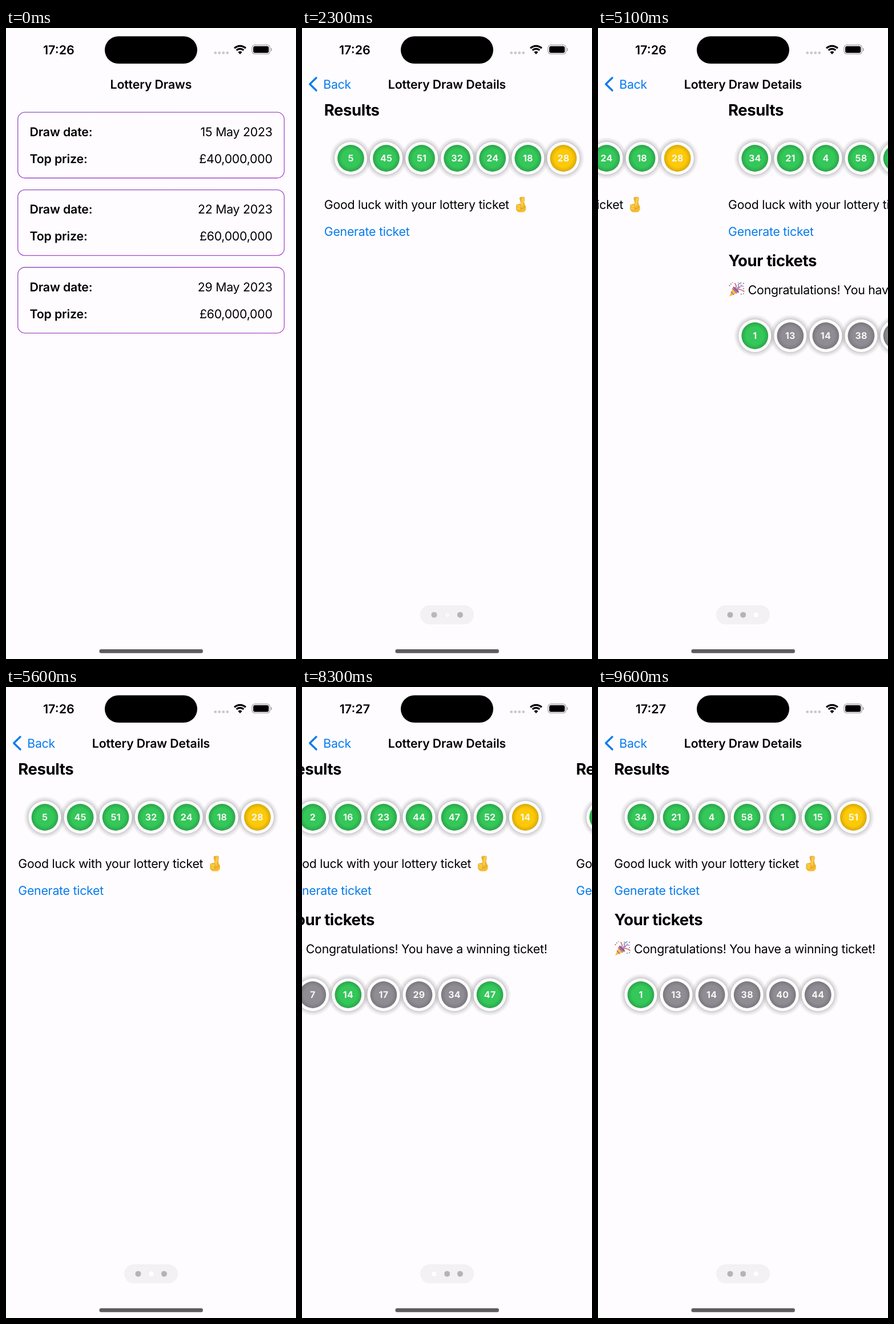
Recreate the animation shown at these times as an HTML page. Size 508 by 1102 pixels, loop 9700 ms.

```html
<!DOCTYPE html>
<html lang="en">
<head>
<meta charset="utf-8">
<title>Lottery Draws</title>
<style>
  html, body { margin: 0; width: 100%; height: 100%; overflow: hidden; background: #fefcff; }
  svg { display: block; width: 100vw; height: 100vh; }
  text {
    font-family: Inter, "Liberation Sans", sans-serif;
    font-optical-sizing: none;
    text-rendering: geometricPrecision;
    white-space: pre;
  }
  .body { font-size: 21.3px; font-weight: 400; letter-spacing: -.245px; }
  .semi { font-size: 21.3px; font-weight: 600; letter-spacing: -.12px; }
  .head { font-size: 27.5px; font-weight: 700; letter-spacing: -.4px; }
  .num  { font-size: 16px; font-weight: 700; letter-spacing: .2px; fill: #f6f8f6; }
  .clock { font-size: 21.5px; font-weight: 600; }
  .link { fill: #067bec; }
</style>
</head>
<body>
<svg id="stage" viewBox="0 0 508 1102" xmlns="http://www.w3.org/2000/svg">
  <defs>
    <linearGradient id="edge" x1="0" y1="0" x2="1" y2="1">
      <stop offset="0" stop-color="#9150c4"/><stop offset="1" stop-color="#ac48cc"/>
    </linearGradient>
    <linearGradient id="shade">
      <stop offset="0" stop-color="#000" stop-opacity="0"/><stop offset="1" stop-color="#000" stop-opacity=".08"/>
    </linearGradient>
    <radialGradient id="halo">
      <stop offset=".74" stop-color="#000" stop-opacity=".23"/>
      <stop offset=".86" stop-color="#000" stop-opacity=".1"/>
      <stop offset="1" stop-color="#000" stop-opacity="0"/>
    </radialGradient>
    <g id="luck" fill="none" stroke-linecap="round" stroke-linejoin="round">
      <path d="M15 15L11.5 4" stroke="#d8951b" stroke-width="5.6"/>
      <path d="M15 15L11.5 4" stroke="#f2b52c" stroke-width="4.6"/>
      <rect x="2.5" y="13" width="17.5" height="14.8" rx="6.5" fill="#f6bd34"/>
      <path d="M12.5 16L15 3.8" stroke="#d8951b" stroke-width="5.8"/>
      <path d="M12.5 16L15 3.8" stroke="#fbcb45" stroke-width="4.8"/>
      <path d="M5 16.500l4 1M5 21l4 1" stroke="#d8951b" stroke-width="5"/>
      <path d="M5 16.500l4 1M5 21l4 1" stroke="#fbcb45" stroke-width="4"/>
      <path d="M18 17q-1 5-8 5" stroke="#d8951b" stroke-width="1.2"/>
    </g>
    <g id="party" fill="none" stroke-linecap="round">
      <path d="M1 26L8 9Q15 11 18 19Z" fill="#f7c23c"/>
      <path d="M4.5 18l4 4.600M7 12l7 8" stroke="#a763c4" stroke-width="1.6"/>
      <ellipse cx="13" cy="14" rx="7" ry="2" transform="rotate(45 13 14)" fill="#8a5a9c"/>
      <path d="M12 12Q15 8 11 3M15 14Q20 12 27 17" stroke="#e65a6c" stroke-width="1.7"/>
      <path d="M14 13Q18 10 17 7T22 2" stroke="#4f9de8" stroke-width="1.7"/>
      <path d="M17 12Q20 7 26 8" stroke="#c77fd6" stroke-width="1.5"/>
      <g stroke-width="2.2">
        <path d="M4 4h.1M26 12h.1M22 22h.1" stroke="#4f9de8"/>
        <path d="M7 1.500h.1M17 2h.1M23 15h.1" stroke="#f5b52f"/>
        <path d="M1.500 7h.1M26 3h.1M19 10h.1" stroke="#e65a6c"/>
        <path d="M26 21h.1M22 6h.1" stroke="#63bd62"/>
      </g>
    </g>
  </defs>
</svg>
<script>
const W = 508, H = 1102, LOOP = 9700, STEP = 100, BG = '#fefcff';
const stage = document.getElementById('stage');
const clamp = v => Math.min(1, Math.max(0, v));

function add(parent, tag, attrs = {}) {
  const el = document.createElementNS('http://www.w3.org/2000/svg', tag);
  for (const k in attrs) el.setAttribute(k, attrs[k]);
  parent.append(el);
  return el;
}
const group = parent => add(parent, 'g');
const rect = (parent, x, y, width, height, rx, fill) =>
  add(parent, 'rect', { x, y, width, height, rx, fill });
const circle = (parent, cx, cy, r, fill) => add(parent, 'circle', { cx, cy, r, fill });
function text(parent, str, x, y, cls, anchor = 'start') {
  const el = add(parent, 'text', { x, y, class: cls, 'text-anchor': anchor });
  el.textContent = str;
  return el;
}
const moveX = (el, x) => el.setAttribute('transform', `translate(${x.toFixed(2)} 0)`);
const fade = (el, a) => el.setAttribute('opacity', a.toFixed(3));

const COLORS = {
  green: ['#34c759', '#2ba54b'],
  gold: ['#fdca08', '#d9a80b'],
  gray: ['#8f8d93', '#7a787e']
};
for (const name in COLORS) {
  const grad = add(stage.querySelector('defs'), 'radialGradient', { id: name });
  const [mid, rim] = COLORS[name];
  add(grad, 'stop', { offset: .66, 'stop-color': mid });
  add(grad, 'stop', { offset: 1, 'stop-color': rim });
}

function balls(parent, nums, y, color) {
  nums.forEach((n, i) => circle(parent, 68 + i * 62.07, y, 37, 'url(#halo)'));
  nums.forEach((n, i) => {
    const x = 68 + i * 62.07;
    circle(parent, x, y, 28.5, '#fff');
    circle(parent, x, y, 23.4, `url(#${color(n, i)})`);
    text(parent, n, x, y + 5.8, 'num', 'middle');
  });
}

// List screen
const list = group(stage);
rect(list, 0, 0, W, H, 0, BG);
[['15 May 2023', '£40,000,000'], ['22 May 2023', '£60,000,000'], ['29 May 2023', '£60,000,000']]
  .forEach(([date, prize], i) => {
    const y = 147.2 + i * 135.4;
    const box = rect(list, 20.7, y, 466.7, 114.8, 12.5, 'none');
    box.setAttribute('stroke', 'url(#edge)');
    box.setAttribute('stroke-width', 1.3);
    text(list, 'Draw date:', 41.4, y + 41.8, 'semi');
    text(list, date, 466.6, y + 41.8, 'body', 'end');
    text(list, 'Top prize:', 41.4, y + 88.8, 'semi');
    text(list, prize, 466.6, y + 88.8, 'body', 'end');
  });
const dim = rect(stage, 0, 0, W, H, 0, '#000');

// Detail screen
const detail = group(stage);
rect(detail, -10, 0, 10, H, 0, 'url(#shade)');
rect(detail, 0, 0, W, H, 0, BG);
const strip = group(detail);

const DRAWS = [
  { nums: [2, 16, 23, 44, 47, 52, 14], ticket: [7, 14, 17, 29, 34, 47], tap: 7200 },
  { nums: [5, 45, 51, 32, 24, 18, 28] },
  { nums: [34, 21, 4, 58, 1, 15, 51], ticket: [1, 13, 14, 38, 40, 44], tap: 4300 }
];
DRAWS.forEach((draw, i) => {
  const page = group(strip);
  moveX(page, i * W);
  text(page, 'Results', 21.2, 153.4, 'head');
  balls(page, draw.nums, 227.5, (n, k) => k < 6 ? 'green' : 'gold');
  text(page, 'Good luck with your lottery ticket', 21.3, 316, 'body');
  add(page, 'use', { href: '#luck', transform: 'translate(355 294)' });
  draw.button = text(page, 'Generate ticket', 21.3, 363.2, 'body link');
  if (!draw.ticket) return;
  draw.panel = group(page);
  text(draw.panel, 'Your tickets', 21.6, 415.9, 'head');
  add(draw.panel, 'use', { href: '#party', transform: 'translate(22 443)' });
  text(draw.panel, 'Congratulations! You have a winning ticket!', 56, 464.8, 'body');
  balls(draw.panel, draw.ticket, 537.5, n => draw.nums.includes(n) ? 'green' : 'gray');
});

rect(detail, 207, 1008.3, 94, 33.2, 16.6, '#f3f1f4');
const dots = [231.5, 254.2, 277].map(x => {
  circle(detail, x, 1024.9, 5, '#b5b3b7');
  return circle(detail, x, 1024.9, 5, '#fefdff');
});

// Navigation bar
const listTitle = text(stage, 'Lottery Draws', 254, 105.8, 'semi', 'middle');
const detailTitle = text(stage, 'Lottery Draw Details', 254, 105.8, 'semi', 'middle');
const chevron = add(stage, 'path', {
  d: 'M25 87L13.7 98L25 109', fill: 'none', stroke: '#067bec', 'stroke-width': 3.3,
  'stroke-linecap': 'round', 'stroke-linejoin': 'round'
});
const back = text(stage, 'Back', 37.2, 105.8, 'body link');

// Status bar and home indicator
const clock = text(stage, '17:26', 92.4, 45.9, 'clock', 'middle');
rect(stage, 173, 14.4, 162, 47.8, 23.9, '#000');
for (let i = 0; i < 4; i++) rect(stage, 364.6 + i * 7, 41.2, 4.4, 4.4, 1.4, '#c9c7cb');
const arc = (r, width) => {
  const dx = r * Math.SQRT1_2;
  add(stage, 'path', {
    d: `M${410 - dx} ${45.2 - dx}A${r} ${r} 0 0 1 ${410 + dx} ${45.2 - dx}`,
    fill: 'none', stroke: '#000', 'stroke-width': width
  });
};
arc(13.9, 3.2);
arc(8.9, 3.2);
add(stage, 'path', { d: 'M410 46L406.3 42Q410 38.8 413.7 42Z' });
const shell = rect(stage, 431, 29.6, 31.4, 15.9, 5, 'none');
shell.setAttribute('stroke', '#9f9da1');
shell.setAttribute('stroke-width', 1.2);
rect(stage, 433.1, 31.7, 27.2, 11.8, 3.2, '#000');
rect(stage, 464, 35, 1.7, 5.2, .8, '#a4a2a6');
rect(stage, 163.5, 1085.1, 181.5, 6.6, 3.3, '#5d5c5f');

// Start time, page left, page reached
const SWIPES = [[1995, 0, 1], [3200, 1, 2], [5000, 2, 1], [6205, 1, 0], [8300, 0, 1], [9258, 1, 2]];
const glide = s => 1 - Math.exp(-38.77 * (s + .138) ** 3);
const settle = x => 1 - (1 + x) * Math.exp(-x);

function pager(t) {
  let pos = 0, from = 0, to = 0, mix = 1;
  for (const [start, a, b] of SWIPES) {
    const s = (t - start) / 1000;
    if (s < -.01) break;
    [from, to] = [a, b];
    pos = a + (b - a) * (s > .55 ? 1 : glide(s));
    mix = clamp((s - .12) / .2);
  }
  return { pos, lit: dots.map((d, i) => (i === to ? mix : 0) + (i === from ? 1 - mix : 0)) };
}

function draw(t) {
  const push = t < 600 ? 0 : t >= 1300 ? 1 : settle((t - 550) / 1000 * 13);
  moveX(list, -.3 * W * push);
  fade(dim, .1 * push);
  moveX(detail, (W + 10) * (1 - push));
  moveX(listTitle, -180 * push);
  fade(listTitle, clamp(1 - push * 1.6));
  moveX(detailTitle, 260 * (1 - push));
  fade(detailTitle, clamp(push * 1.3 - .3));
  moveX(back, 150 * (1 - push));
  fade(back, clamp(push * 1.4 - .4));
  fade(chevron, clamp(push * 1.2 - .2));

  const { pos, lit } = pager(t);
  moveX(strip, -W * pos);
  dots.forEach((dot, i) => fade(dot, lit[i]));

  for (const { tap, button, panel } of DRAWS) {
    if (!panel) continue;
    const since = t - tap;
    fade(button, since < 0 ? 1 : clamp(.25 + since / 500));
    fade(panel, since < 100 ? 0 : 1);
  }
  clock.textContent = t < 7500 ? '17:26' : '17:27';
}

const begin = performance.now();
function tick() {
  const t = (performance.now() - begin) % LOOP;
  draw(Math.floor(t / STEP) * STEP);
  requestAnimationFrame(tick);
}
tick();
</script>
</body>
</html>
```
